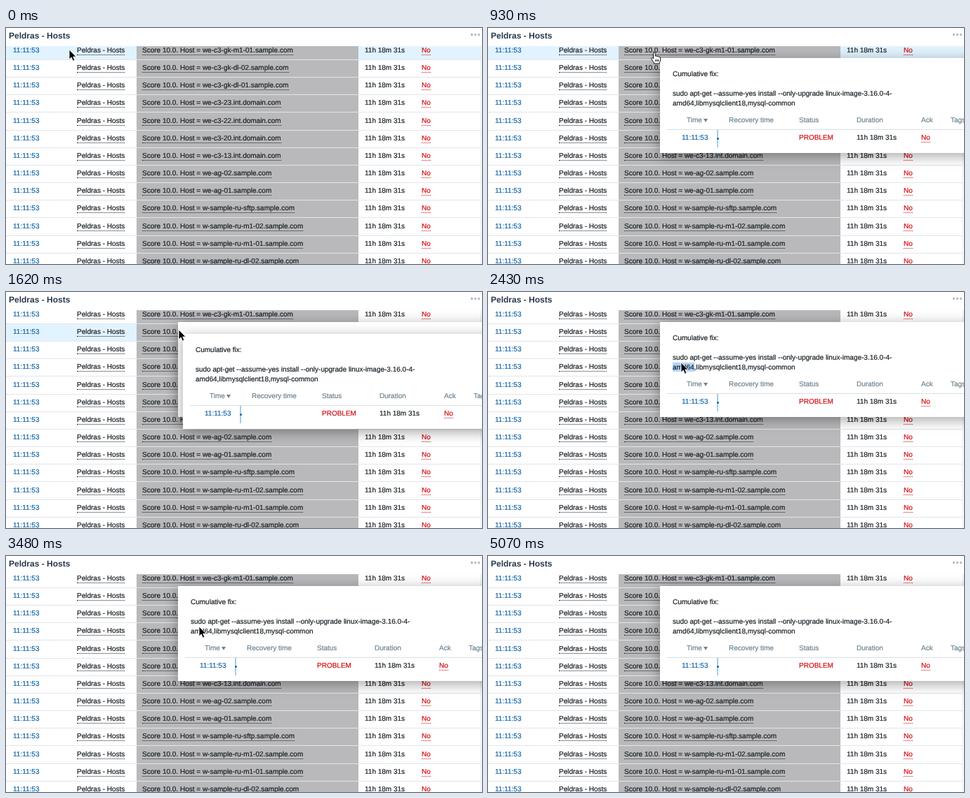
An HTML page for the animation above (5.1 s loop, 678 by 338 pixels).

```html
<!DOCTYPE html>
<html lang="en">
<head>
<meta charset="utf-8">
<title>Problem list</title>
<style>
  html, body { margin: 0; width: 100%; height: 100%; overflow: hidden; }
  body {
    position: relative; background: #fff; color: #181f24;
    font: 10px/11px "Liberation Sans", Arial, sans-serif;
    text-rendering: geometricPrecision;
  }
  #stage { position: absolute; left: 0; top: 0; width: 678px; height: 338px; overflow: hidden; }
  #stage * { position: absolute; }
  .t { white-space: pre; -webkit-text-stroke: .2px currentColor; }
  .time { color: #0f62a4; }
  .red { color: #d20a10; }
  .head { color: #6c8290; }
  .link { border-bottom: 1px dotted currentColor; }
  .title { left: 4px; top: 4px; font: bold 12px/14px "Liberation Sans", Arial, sans-serif; color: #26384a; white-space: pre; }
  .menu i { top: 8px; width: 3px; height: 3px; border-radius: 1px; background: #b0bac4; }

  .row { left: 0; width: 676px; }
  .cell { left: 186px; top: 26px; width: 316px; height: 312px; background: #b9b9bb; }
  .line { left: 0; width: 676px; border-top: 1px solid #e2e5ea; }
  .edge { left: 676px; top: 26px; height: 312px; border-left: 1px solid #e6e9ee; }

  .popup {
    left: 0; top: 0; width: 462px; height: 136px; background: #fff;
    box-shadow: 0 4px 18px rgba(0, 0, 0, .36);
  }
  .rule { left: 10px; top: 102px; width: 443px; border-top: 1px solid #d8dfe4; }
  .axis { left: 81px; top: 103px; width: 2px; height: 25px; background: #a3cde8; }
  .dot { left: 81px; top: 114px; width: 3px; height: 3px; border-radius: 50%; background: #0f62a4; }
  .tri { left: 62px; top: 87px; border: 3px solid transparent; border-top: 5px solid #6c8290; border-bottom: 0; }
  .sel { left: 18px; top: 58px; width: 31px; height: 13px; background: #b0d5fb; }
  svg { left: 0; top: 0; overflow: visible; }

  .hot0, .hot1 { background: #e1f3ff; }
  .hot0, .hot1, .sel, #pinned, #hover, #cursor, #arrow, #hand { animation: 5.1s step-end infinite; }
  .hot0 { animation-name: hot0; }
  .hot1 { animation-name: second; }
  .sel { animation-name: select; }
  #pinned { animation-name: follow, pinned; animation-timing-function: linear, step-end; }
  #hover { animation-name: nudge, second; animation-timing-function: linear, step-end; }
  #cursor { animation-name: move, leave; animation-timing-function: linear, step-end; }
  #arrow { animation-name: arrow; }
  #hand { animation-name: hand; }

  @keyframes hot0 { 0% { opacity: 1 } 29.6%, 100% { opacity: 0 } }
  @keyframes second { 0% { opacity: 0 } 29.6% { opacity: 1 } 34.5%, 100% { opacity: 0 } }
  @keyframes select { 0% { opacity: 0 } 43% { opacity: 1 } 59%, 100% { opacity: 0 } }
  @keyframes pinned { 0% { opacity: 0 } 9.4%, 100% { opacity: 1 } }
  @keyframes leave { 0% { opacity: 1 } 82%, 100% { opacity: 0 } }
  @keyframes follow {
    0%, 9.4% { transform: translate(195px, 46px) }
    10% { transform: translate(202px, 46px) }
    15%, 100% { transform: translate(245px, 43px) }
  }
  @keyframes nudge {
    0%, 29.6% { transform: translate(247px, 51px) }
    31.4%, 100% { transform: translate(252px, 60px) }
  }
  @keyframes move {
    0%, 2% { transform: translate(90px, 31px) }
    10% { transform: translate(202px, 38px) }
    15%, 27.8% { transform: translate(237px, 35px) }
    31.4%, 34% { transform: translate(246px, 54px) }
    39%, 100% { transform: translate(275px, 101px) }
  }
  @keyframes hand {
    0% { opacity: 0 } 2.8% { opacity: 1 } 7.6% { opacity: 0 }
    9.4% { opacity: 1 } 29.6%, 100% { opacity: 0 }
  }
  @keyframes arrow {
    0% { opacity: 1 } 2.8% { opacity: 0 } 7.6% { opacity: 1 }
    9.4% { opacity: 0 } 29.6%, 100% { opacity: 1 }
  }
</style>
</head>
<body>
<div id="stage">
  <div class="title">Peldras - Hosts</div>
  <div class="menu">
    <i style="left:662px"></i><i style="left:667px"></i><i style="left:672px"></i>
  </div>
  <div id="table"></div>
  <div class="popup" id="pinned"></div>
  <div class="popup" id="hover"></div>
  <div id="cursor">
    <svg id="arrow" width="12" height="18">
      <path d="M0 0V14L3.2 11.1L5.4 16.2L7.9 15.1L5.7 10.2H10Z" fill="#000" stroke="#fff" stroke-width=".9"/>
    </svg>
    <svg id="hand" width="14" height="17">
      <path d="M-1.4 9V1.4Q-1.3 0 0 0Q1.2 0 1.3 1.4V5.2Q2.8 4.4 3.8 5.7Q5.3 5 6.2 6.3Q8.6 5.9 8.7 8V11Q8.4 13 7.2 14.4V16H-.6V14.6Q-2 13-3.9 9.8Q-4.8 8.2-3.6 7.6Q-2.6 7.2-1.4 9ZM1.7 10V13M3.7 10V13M5.7 10V13"
        fill="#fff" stroke="#111" stroke-width="1" stroke-linejoin="round"/>
    </svg>
  </div>
</div>
<script>
  const table = document.getElementById('table');
  const hosts = [
    'we-c3-gk-m1-01.sample', 'we-c3-gk-dl-02.sample', 'we-c3-gk-dl-01.sample',
    'we-c3-23.int.domain', 'we-c3-22.int.domain', 'we-c3-20.int.domain', 'we-c3-13.int.domain',
    'we-ag-02.sample', 'we-ag-01.sample', 'w-sample-ru-sftp.sample',
    'w-sample-ru-m1-02.sample', 'w-sample-ru-m1-01.sample', 'w-sample-ru-dl-02.sample'
  ];

  function box(parent, cls, style = {}) {
    const el = document.createElement('div');
    el.className = cls;
    Object.assign(el.style, style);
    return parent.appendChild(el);
  }

  // y is the baseline
  function text(parent, x, y, str, cls = '') {
    box(parent, 't ' + cls, { left: x + 'px', top: y - 9 + 'px' }).textContent = str;
  }

  const lineY = i => Math.round(45 + 25.15 * i);

  [0, 1].forEach(i => {
    const top = i ? lineY(0) + 1 : 26;
    box(table, 'row hot' + i, { top: top + 'px', height: lineY(i) - top + 'px' });
  });
  box(table, 'cell');
  box(table, 'edge');
  hosts.forEach((host, i) => {
    const y = lineY(i) - 9;
    box(table, 'line', { top: lineY(i) + 'px' });
    text(table, 10, y, '11:11:53', 'time');
    text(table, 101, y, 'Peldras - Hosts', 'link');
    text(table, 194, y, `Score 10.0. Host = ${host}.com`, 'link');
    text(table, 511, y, '11h 18m 31s');
    text(table, 592, y, 'No', 'red link');
  });

  function fillPopup(el) {
    if (el.id === 'pinned') box(el, 'sel');
    text(el, 18, 27, 'Cumulative fix:');
    text(el, 18, 55, 'sudo apt-get --assume-yes install --only-upgrade linux-image-3.16.0-4-');
    text(el, 18, 69, 'amd64,libmysqlclient18,mysql-common');
    const heads = { Time: 38, 'Recovery time': 98, Status: 198, Duration: 280, Ack: 372, Tags: 414 };
    for (const [name, x] of Object.entries(heads)) text(el, x, 93, name, 'head');
    ['tri', 'rule', 'axis', 'dot'].forEach(cls => box(el, cls));
    text(el, 31, 118, '11:11:53', 'time');
    text(el, 198, 118, 'PROBLEM', 'red');
    text(el, 280, 118, '11h 18m 31s');
    text(el, 372, 118, 'No', 'red link');
  }
  document.querySelectorAll('.popup').forEach(fillPopup);
</script>
</body>
</html>
```
